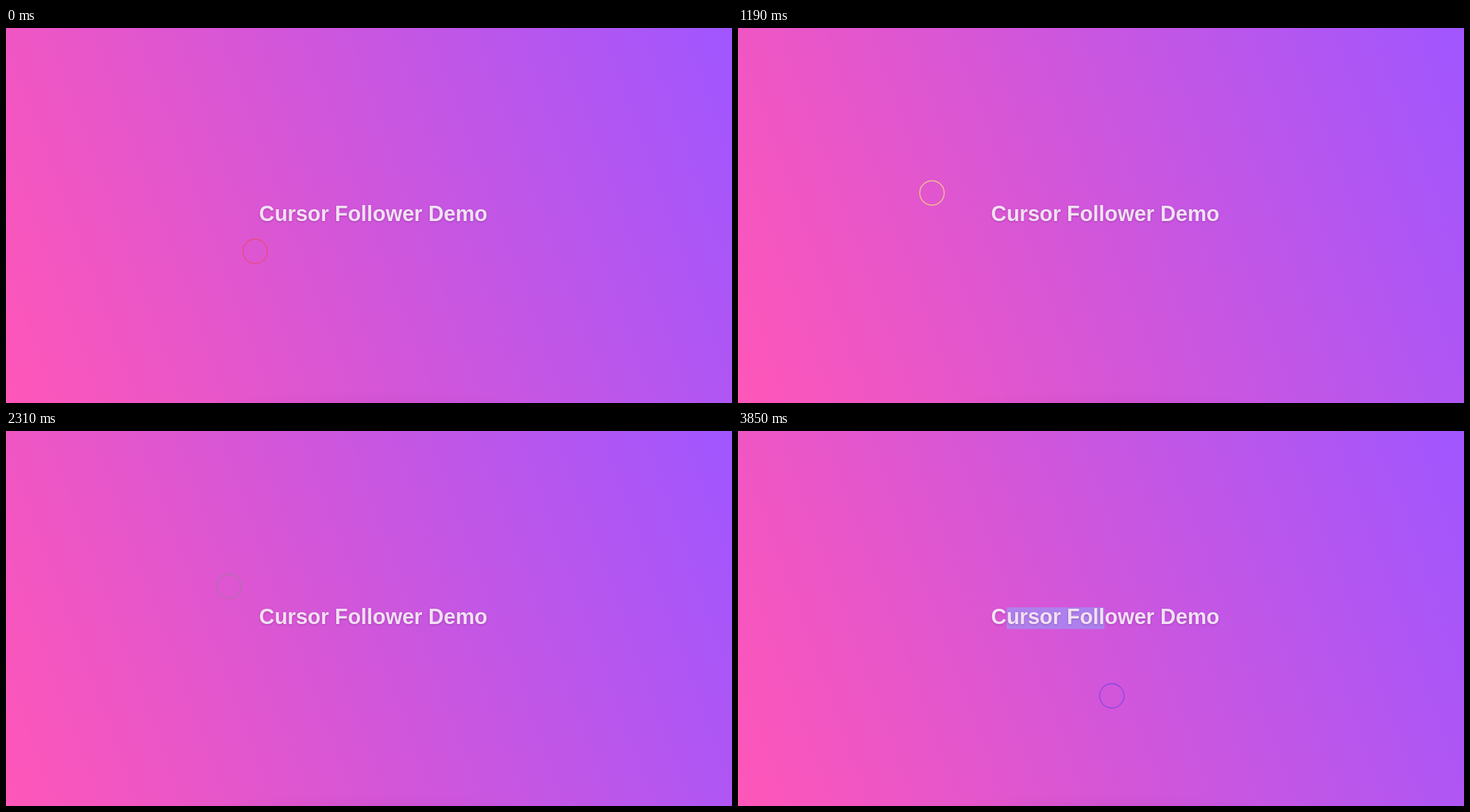
These frames come from a looping animation (1040 by 538 pixels, 3.92 s). An HTML page with a canvas:

```html
<!DOCTYPE html>
<html lang="en">
<head>
<meta charset="utf-8">
<title>Cursor Follower Demo</title>
<style>
  html, body { margin: 0; width: 100%; height: 100%; overflow: hidden; }
  body { background: linear-gradient(70deg, #ff56b8, #a056ff); }
  canvas { display: block; }
</style>
</head>
<body>
<canvas id="stage" width="1040" height="538"></canvas>
<script>
const ctx = document.getElementById('stage').getContext('2d');
const LOOP = 3920, STEP = 70;
const TITLE = 'Cursor Follower Demo';
const TITLE_X = 362.6, BASELINE = 277;
const SELECT_FROM = 2800, SELECT_START = 1, SELECT_END = 11;
const CURSOR_LEAD = 18;

// turning points of the pointer's path
const PATH = [
  { t: 0, x: 357, y: 320.5 },
  { t: 770, x: 328.5, y: 214.5 },
  { t: 1540, x: 249, y: 260.5 },
  { t: 2310, x: 319.5, y: 222.5 },
  { t: 2730, x: 367, y: 257.5 },
  { t: 3360, x: 507.5, y: 265 },
  { t: 3850, x: 535.5, y: 380 }
];

function slope(i, axis) {
  const a = PATH[Math.max(i - 1, 0)], b = PATH[Math.min(i + 1, PATH.length - 1)];
  return (b[axis] - a[axis]) / (b.t - a.t);
}

// smooth Hermite curve through the path
function position(t, axis) {
  let i = 0;
  while (i < PATH.length - 2 && t >= PATH[i + 1].t) i++;
  const a = PATH[i], b = PATH[i + 1], span = b.t - a.t;
  const u = (t - a.t) / span, v = 1 - u;
  return v * v * ((1 + 2 * u) * a[axis] + u * span * slope(i, axis)) +
         u * u * ((1 + 2 * v) * b[axis] - v * span * slope(i + 1, axis));
}

const bell = (t, peak, width) => Math.exp(-(((t - peak) / width) ** 2));

// red warms to pale yellow, then cools to violet
function ringColor(t) {
  const r = 135 + 120 * bell(t, 700, 1500);
  const g = 70 + 135 * bell(t, 1450, 800);
  const b = 125 + 105 * (t / LOOP) ** 1.5;
  return `rgb(${r}, ${g}, ${b})`;
}

function charX(n) {
  return TITLE_X + ctx.measureText(TITLE.slice(0, n)).width;
}

function drawSelection(cursorX) {
  let end = SELECT_START;
  while (end < SELECT_END && (charX(end) + charX(end + 1)) / 2 <= cursorX) end++;
  const left = Math.round(charX(SELECT_START)), right = Math.round(charX(end));
  ctx.fillStyle = 'rgba(150, 155, 250, .62)';
  ctx.fillRect(left, 253, right - left, 31);
}

function drawTitle() {
  ctx.save();
  ctx.shadowColor = 'rgba(70, 0, 80, .3)';
  ctx.shadowBlur = 3;
  ctx.shadowOffsetY = 1;
  ctx.fillStyle = '#f2e0f4';
  ctx.fillText(TITLE, TITLE_X, BASELINE);
  ctx.restore();
}

function drawBottomShade() {
  ctx.save();
  ctx.translate(524, 542);
  ctx.scale(1, 0.09);
  const shade = ctx.createRadialGradient(0, 0, 0, 0, 0, 235);
  shade.addColorStop(0, 'rgba(130, 30, 130, .08)');
  shade.addColorStop(1, 'rgba(130, 30, 130, 0)');
  ctx.fillStyle = shade;
  ctx.fillRect(-235, -235, 470, 470);
  ctx.restore();
}

function drawRing(x, y, color) {
  ctx.beginPath();
  ctx.arc(x, y, 17.5, 0, Math.PI * 2);
  ctx.lineWidth = 1.4;
  ctx.strokeStyle = color;
  ctx.stroke();
}

function draw(now) {
  const t = Math.floor((now % LOOP) / STEP) * STEP;
  const x = position(t, 'x'), y = position(t, 'y');
  ctx.clearRect(0, 0, 1040, 538);
  ctx.font = 'bold 30.5px "Liberation Sans", Arial, sans-serif';
  ctx.fontKerning = 'none';
  drawBottomShade();
  if (t >= SELECT_FROM) drawSelection(x + CURSOR_LEAD);
  drawTitle();
  drawRing(x, y, ringColor(t));
}

const start = performance.now();
function tick() {
  draw(performance.now() - start);
  requestAnimationFrame(tick);
}
tick();
</script>
</body>
</html>
```
